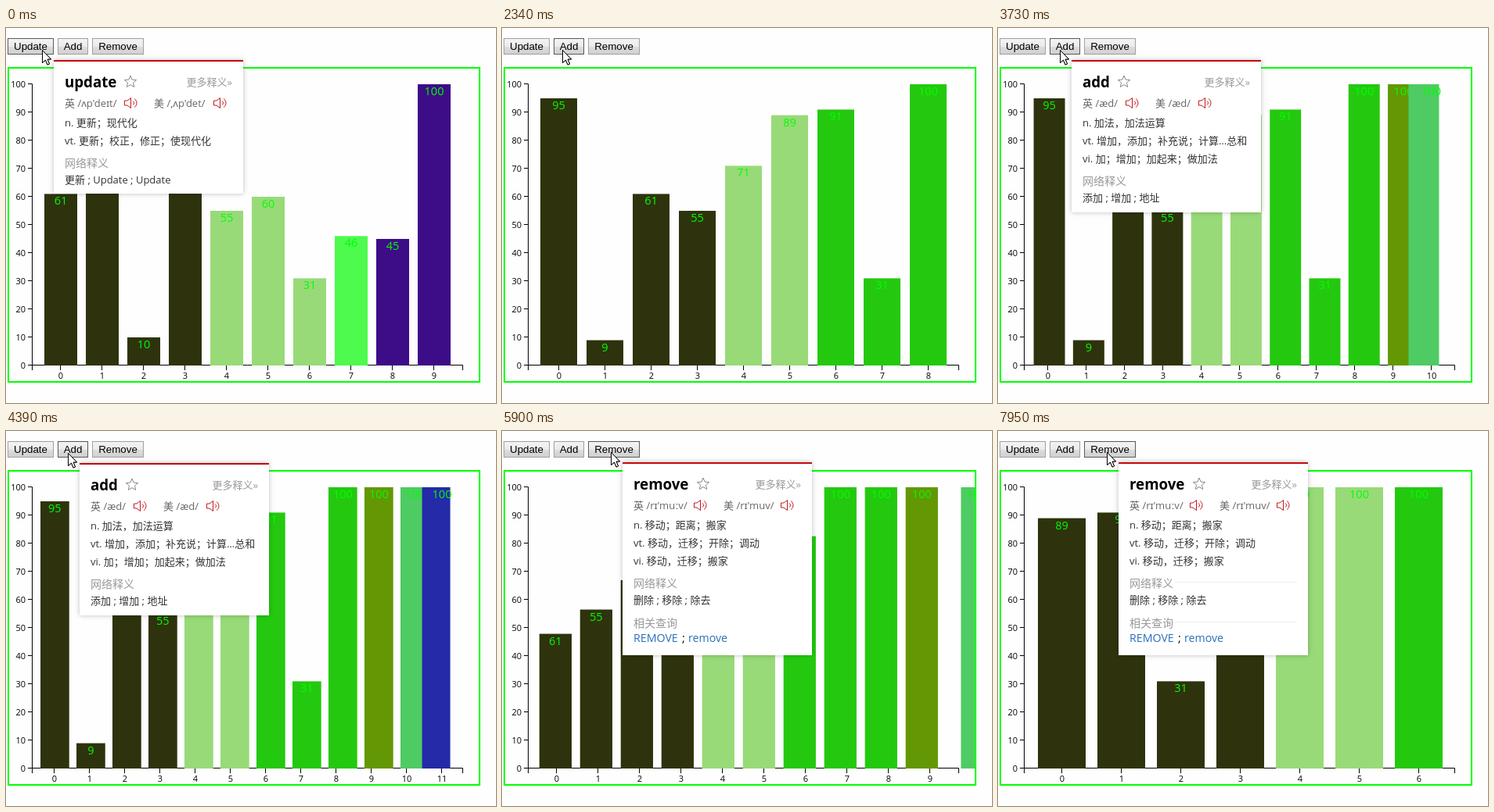
Animation, 626 px wide and 480 px high, one loop 8 s. Source, as an HTML page with a canvas:

```html
<!DOCTYPE html>
<html lang="zh">
<head>
<meta charset="utf-8">
<title>Bar chart: update, add, remove</title>
<style>
  html, body { margin: 0; height: 100%; overflow: hidden; background: #fefefe; }
  canvas { display: block; }
</style>
</head>
<body>
<canvas id="stage" width="626" height="480"></canvas>
<script>
const ctx = document.getElementById('stage').getContext('2d');
const LOOP = 8000, DURATION = 500;
const LEFT = 34, BASE = 432, WIDTH = 550, HEIGHT = 360, EDGE = 604;
const SANS = '"Open Sans", "Noto Sans CJK SC", "Noto Sans CJK", "Noto Sans", sans-serif';
const BUTTON_FONT = '13.333px "Liberation Sans", Arial, sans-serif';

// Each click replaces the data
const states = [
  { at: -1000, data: [61, 83, 10, 77, 55, 60, 31, 46, 45, 100] },
  { at: 260, data: [51, 26, 70, 47, 60, 45, 91, 77, 90, 14, 17, 81, 100] },
  { at: 1218, data: [73, 6, 89, 10, 38, 16] },
  { at: 1725, data: [95, 9, 61, 55, 71, 89, 91, 31, 100] }
];
const lastData = () => states[states.length - 1].data;
for (const at of [2804, 3446, 4089]) states.push({ at, data: [...lastData(), 100] });
for (const at of [4932, 5600, 6270, 6870, 7465]) states.push({ at, data: lastData().slice(1) });

// Bars keep the colour of the batch they were created in
const DARK = '#2e330d', LIGHT = '#98da78', PURPLE = '#3d0c87', TEAL = '#44857c', GREEN = '#24c90f';
const base = [DARK, DARK, DARK, DARK, LIGHT, LIGHT];
const earlyColors = [...base, LIGHT, '#4dfa4d', PURPLE, PURPLE, TEAL, TEAL, TEAL];
const lateColors = [...base, GREEN, GREEN, GREEN, '#639804', '#4fcb63', '#242aa8'];

const buttons = [
  { text: 'Update', x: 2, w: 59, from: 0, to: 1990 },
  { text: 'Add', x: 66, w: 39, from: 2330, to: 4620 },
  { text: 'Remove', x: 110, w: 66, from: 4720, to: LOOP }
];

const cursorPath = [[0, 46, 28], [1900, 46, 28], [2010, 50, 36], [2360, 79, 28],
  [4440, 79, 28], [4800, 139, 27], [LOOP, 139, 27]];

const popups = [
  { from: 0, to: 2090, x: 61, y: 41, h: 171, word: 'update', titleW: 66,
    uk: "/ʌp'deɪt/", us: "/,ʌp'det/", icons: [90, 204],
    defs: ['n. 更新；现代化', 'vt. 更新；校正，修正；使现代化'], web: '更新 ; Update ; Update' },
  { from: 3380, to: 4560, x: 94, y: 41, h: 195, word: 'add', titleW: 35,
    uk: '/æd/', us: '/æd/', icons: [69, 162],
    defs: ['n. 加法，加法运算', 'vt. 增加，添加；补充说；计算…总和', 'vi. 加；增加；加起来；做加法'],
    web: '添加 ; 增加 ; 地址' },
  { from: 5680, to: LOOP, x: 154, y: 40, h: 247, word: 'remove', titleW: 71,
    uk: "/rɪ'muːv/", us: "/rɪ'muv/", icons: [91, 202],
    defs: ['n. 移动；距离；搬家', 'vt. 移动，迁移；开除；调动', 'vi. 移动，迁移；搬家'],
    web: '删除 ; 移除 ; 除去', related: ['REMOVE', 'remove'] }
];

const mix = (a, b, k) => a + (b - a) * k;
const easeCubic = t => t < .5 ? 4 * t ** 3 : 1 - 4 * (1 - t) ** 3;
const during = (item, t) => t >= item.from && t < item.to;

function text(str, x, y, font, color, align = 'left') {
  ctx.font = font;
  ctx.fillStyle = color;
  ctx.textAlign = align;
  ctx.fillText(str, x, y);
}

function line(color, ...points) {
  ctx.strokeStyle = color;
  ctx.lineWidth = 1;
  ctx.beginPath();
  points.forEach(([x, y]) => ctx.lineTo(x, y));
  ctx.stroke();
}

// Rounded band scale with padding 0.2
function bands(n) {
  const step = Math.floor(WIDTH / (n + .2));
  const start = Math.round((WIDTH - step * (n - .2)) / 2);
  return { w: Math.round(step * .8), x: i => LEFT + start + step * i };
}

function layout(data) {
  const band = bands(data.length), max = Math.max(...data);
  return data.map((v, i) => ({ v, x: band.x(i), w: band.w, h: v / max * HEIGHT }));
}

function drawAxes(data) {
  const max = Math.max(...data), font = '11px ' + SANS;
  line('#000', [28, 71.5], [33.5, 71.5], [33.5, 431.5], [28, 431.5]);
  line('#000', [33.5, 438], [33.5, 431.5], [583.5, 431.5], [583.5, 438]);
  for (let v = 0; v <= max; v += 10) {
    const y = Math.round(BASE - v / max * HEIGHT) - .5;
    line('#000', [28, y], [33, y]);
    text(v, 25, y + 4.5, font, '#000', 'right');
  }
  const band = bands(data.length);
  data.forEach((_, i) => {
    const x = band.x(i) + Math.round(band.w / 2);
    line('#000', [x - .5, 432], [x - .5, 438]);
    text(i, x, 449, font, '#000', 'center');
  });
}

function drawBar({ x, w, h, v, labelX = x + w / 2 }, color) {
  ctx.fillStyle = color;
  ctx.fillRect(x, BASE - h, w, h);
  text(v, labelX, BASE - h + 14, '14.5px ' + SANS, '#0f0', 'center');
}

function drawChart(t) {
  const k = states.findLastIndex(s => s.at <= t);
  const e = easeCubic(Math.min(1, (t - states[k].at) / DURATION));
  const now = layout(states[k].data);
  const old = k ? layout(states[k - 1].data) : now;
  const colors = k < 3 ? earlyColors : lateColors;

  ctx.strokeStyle = '#0f0';
  ctx.lineWidth = 2;
  ctx.strokeRect(3, 51, 602, 402);
  ctx.save();
  ctx.beginPath();
  ctx.rect(4, 52, 600, 400);
  ctx.clip();
  drawAxes(states[k].data);
  for (let i = 0; i < Math.max(now.length, old.length); i++) {
    const a = old[i], b = now[i];
    if (!b) {
      if (e < 1) drawBar({ ...a, x: mix(a.x, EDGE, e) }, colors[i]);
    } else if (!a) {
      drawBar({ ...b, x: mix(b.x - 30, b.x, e), labelX: b.x + b.w / 2 }, colors[i]);
    } else {
      drawBar({ v: b.v, x: mix(a.x, b.x, e), w: mix(a.w, b.w, e), h: mix(a.h, b.h, e) }, colors[i]);
    }
  }
  ctx.restore();
}

function drawButton(b, t) {
  const fill = ctx.createLinearGradient(0, 13, 0, 34);
  [[0, '#f4f4f4'], [.5, '#ebebeb'], [.52, '#dddddd'], [1, '#cfcfcf']]
    .forEach(([p, c]) => fill.addColorStop(p, c));
  ctx.fillStyle = fill;
  ctx.fillRect(b.x, 13, b.w, 21);
  ctx.strokeStyle = during(b, t) ? '#5a5a5a' : '#a0a0a0';
  ctx.lineWidth = 1;
  ctx.strokeRect(b.x + .5, 13.5, b.w - 1, 20);
  text(b.text, b.x + b.w / 2, 28, BUTTON_FONT, '#000', 'center');
}

function drawStar(x, y) {
  const points = Array.from({ length: 11 }, (_, i) => {
    const r = i % 2 ? 3.6 : 8, a = i * Math.PI / 5 - Math.PI / 2;
    return [x + r * Math.cos(a), y + r * Math.sin(a)];
  });
  line('#888', ...points);
}

function drawSpeaker(x, y) {
  const red = '#c4161c';
  line(red, [x + .5, y - 3], [x + 4, y - 3], [x + 8.5, y - 6.5], [x + 8.5, y + 6.5],
    [x + 4, y + 3], [x + .5, y + 3], [x + .5, y - 3]);
  for (const r of [3, 6.5]) {
    ctx.beginPath();
    ctx.arc(x + 9.5, y, r, -1, 1);
    ctx.stroke();
  }
}

function drawPopup(p, t) {
  const { x, y } = p, left = x + 14, body = '13px ' + SANS, head = '14px ' + SANS;
  ctx.save();
  ctx.shadowColor = 'rgba(0,0,0,.25)';
  ctx.shadowBlur = 6;
  ctx.fillStyle = '#fff';
  ctx.fillRect(x, y, 242, p.h);
  ctx.restore();
  ctx.fillStyle = '#c4080d';
  ctx.fillRect(x, y, 242, 2);

  text(p.word, left, y + 35, 'bold 18.7px ' + SANS, '#000');
  drawStar(left + p.titleW + 18, y + 28);
  text('更多释义»', x + 228, y + 33, body, '#999', 'right');

  const [uk, us] = p.icons;
  text('英 ' + p.uk, left, y + 60, body, '#666');
  text('美 ' + p.us, x + uk + 38, y + 60, body, '#666');
  drawSpeaker(x + uk, y + 55);
  drawSpeaker(x + us, y + 55);

  p.defs.forEach((d, i) => text(d, left, y + 85 + 23 * i, body, '#333'));
  const webY = y + 91 + 23 * p.defs.length;
  text('网络释义', left, webY, head, '#999');
  text(p.web, left, webY + 21, body, '#333');

  if (p.related) {
    const linkFont = '14.2px ' + SANS;
    text('相关查询', left, webY + 51, head, '#999');
    text(p.related[0], left, webY + 70, linkFont, '#2a6ebb');
    text(';', left + 62, webY + 70, linkFont, '#000');
    text(p.related[1], left + 70, webY + 70, linkFont, '#2a6ebb');
    if (t > 7560) [153.5, 204.5].forEach(d => line('#eee', [x + 72, y + d], [x + 228, y + d]));
  }
}

function drawCursor(t) {
  const i = cursorPath.findIndex(p => p[0] > t);
  const [t0, x0, y0] = cursorPath[i - 1], [t1, x1, y1] = cursorPath[i];
  const k = (t - t0) / (t1 - t0);
  ctx.save();
  ctx.translate(Math.round(mix(x0, x1, k)) + .5, Math.round(mix(y0, y1, k)) + .5);
  ctx.fillStyle = '#fff';
  line('#000', [0, 0], [0, 16], [4, 12.5], [6.5, 18.5], [9, 17.5], [6.5, 11.5], [11, 11.5], [0, 0]);
  ctx.fill();
  ctx.stroke();
  ctx.restore();
}

const startTime = performance.now();
function frame() {
  const t = (performance.now() - startTime) % LOOP;
  ctx.fillStyle = '#fefefe';
  ctx.fillRect(0, 0, 626, 480);
  buttons.forEach(b => drawButton(b, t));
  drawChart(t);
  popups.filter(p => during(p, t)).forEach(p => drawPopup(p, t));
  drawCursor(t);
  requestAnimationFrame(frame);
}
frame();
</script>
</body>
</html>
```
